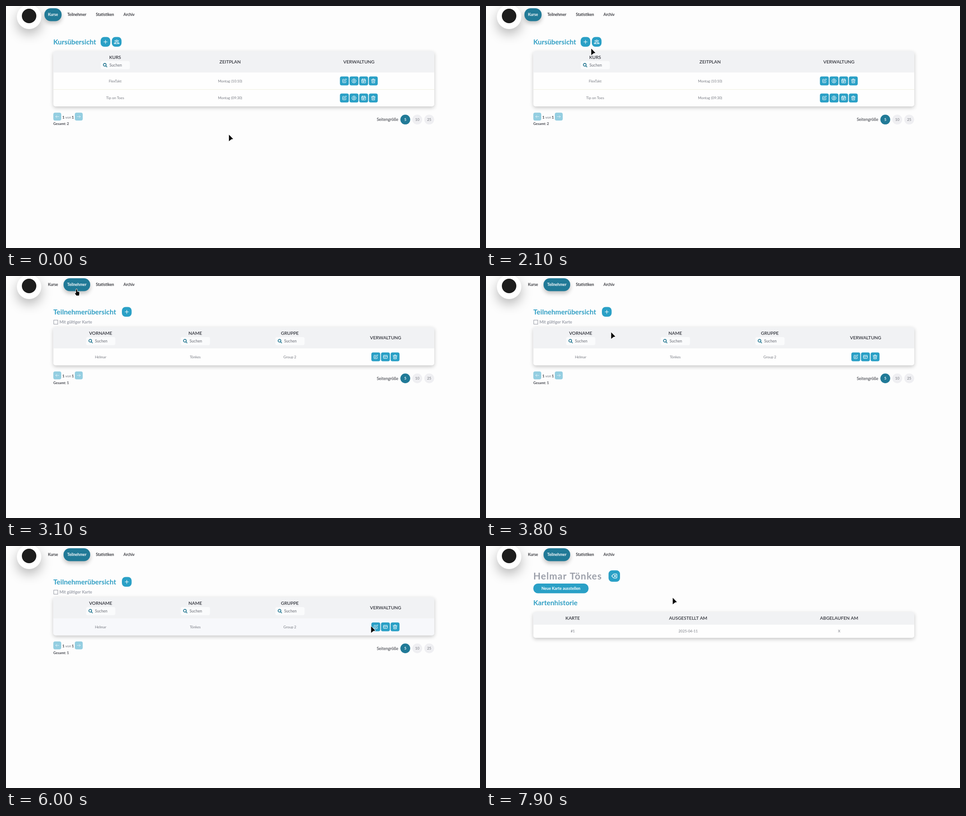
An HTML page with a canvas for the animation above (8000 ms loop, 1047x535 px).

```html
<!DOCTYPE html>
<html lang="de">
<head>
<meta charset="utf-8">
<title>Kursverwaltung</title>
<style>
html, body { margin: 0; width: 100%; height: 100%; overflow: hidden; background: #fdfdfd; }
canvas { display: block; width: 1047px; height: 535px; }
</style>
</head>
<body>
<canvas id="stage" width="1047" height="535"></canvas>
<script>
const ctx = document.getElementById('stage').getContext('2d');
const LOOP = 8000, STEP = 100;
const MAIN = '#2aa0c6', DARK = '#217a97', LIGHT = '#59bad7', PALE = '#94cee1';
const INK = '#30323a', GREY = '#777a82', HEAD = '#f1f2f4', HOVER = '#f7f8fb', PAGE = '#fdfdfd';
const LEFT = 104.5, RIGHT = 946;

// Pointer stops: time, x, y
const PATH = [
  [0, 492, 284], [200, 492, 284], [700, 470, 269], [1100, 417, 234], [1500, 338, 182],
  [2000, 250, 110], [2500, 160, 29], [2700, 146, 19], [3000, 146, 19], [3300, 174, 48],
  [3800, 276, 124], [4200, 366, 174], [4500, 435, 207], [4700, 468, 214], [4900, 484, 215],
  [5300, 620, 206], [5700, 775, 182], [5800, 800, 178], [6000, 806, 177], [6200, 837, 174],
  [7300, 837, 177], [7500, 780, 169], [7700, 672, 153], [7800, 672, 153], [7900, 412, 114], [8000, 412, 114]
];

// Icons on a 24 unit grid
const ICONS = {
  plus: 'M12 5v14M5 12h14',
  edit: 'M11 5H6a2 2 0 0 0-2 2v11a2 2 0 0 0 2 2h11a2 2 0 0 0 2-2v-5M17.5 3.5a2 2 0 0 1 3 3L12 15H9v-3z',
  user: 'M21 12a9 9 0 1 1-18 0a9 9 0 1 1 18 0M15 10a3 3 0 1 1-6 0a3 3 0 1 1 6 0M6.5 18.5a6 6 0 0 1 11 0',
  date: 'M5 5h14a2 2 0 0 1 2 2v12a2 2 0 0 1-2 2H5a2 2 0 0 1-2-2V7a2 2 0 0 1 2-2zM8 2v5M16 2v5M3 10h18M7 14h2M11 14h6M7 17h6',
  trash: 'M19 7l-1 14H6L5 7M3 7h18M9 7V3h6v4M10 11v6M14 11v6',
  card: 'M5 5h14a2 2 0 0 1 2 2v10a2 2 0 0 1-2 2H5a2 2 0 0 1-2-2V7a2 2 0 0 1 2-2zM3 10h18M7 15h1M12 15h1',
  group: 'M15 7a3 3 0 1 1-6 0a3 3 0 1 1 6 0M7 20v-2a5 5 0 0 1 10 0v2zM7 10a2 2 0 1 1-1-4M17 10a2 2 0 1 0 1-4M7 20H2v-2a3 3 0 0 1 5-2M17 20h5v-2a3 3 0 0 0-5-2',
  prev: 'M20 12H4M10 6l-6 6 6 6',
  next: 'M4 12h16M14 6l6 6-6 6',
  back: 'M3 12l6.5-6.5a2 2 0 0 1 1.4-.5H19a2 2 0 0 1 2 2v10a2 2 0 0 1-2 2h-8.1a2 2 0 0 1-1.4-.5zM12 9.5l5 5M17 9.5l-5 5',
  find: 'M17 10a7 7 0 1 1-14 0a7 7 0 1 1 14 0M15 15l6 6'
};
for (const name in ICONS) ICONS[name] = new Path2D(ICONS[name]);
const ARROW = new Path2D('M0 0L9.2 9.4L5 10.2L0 14.4Z');
const HAND = new Path2D('M-1.2 .8Q0-.8 1.2 .8V5.2L5 6Q6.4 6.3 6.2 8L5.4 14H-.2L-3.6 9.6Q-3.4 7.8-1.2 9Z');

function box(x, y, w, h, r, fill, shadow) {
  ctx.save();
  if (shadow) [ctx.shadowColor, ctx.shadowBlur, ctx.shadowOffsetY] = shadow;
  ctx.fillStyle = fill;
  ctx.beginPath();
  ctx.roundRect(x, y, w, h, r);
  ctx.fill();
  ctx.restore();
}

// y is the middle of the capitals
function text(str, x, y, size, weight = 400, color = INK, align = 'center', spacing = 0) {
  ctx.font = `${weight} ${size}px Lato, "Open Sans", sans-serif`;
  ctx.letterSpacing = spacing + 'px';
  ctx.textAlign = align;
  ctx.fillStyle = color;
  ctx.fillText(str, x, y + size * 0.36);
}

function icon(name, x, y, size, color = '#fff', weight = 2) {
  ctx.save();
  ctx.translate(x - size / 2, y - size / 2);
  ctx.scale(size / 24, size / 24);
  ctx.strokeStyle = color;
  ctx.lineWidth = weight;
  ctx.lineCap = ctx.lineJoin = 'round';
  ctx.stroke(ICONS[name]);
  ctx.restore();
}

function button(name, x, y, size, r, fill = MAIN) {
  box(x, y, size, size, r, fill);
  icon(name, x + size / 2, y + size / 2, size * 0.6);
}

function title(str, y) { text(str, LEFT, y, 15.3, 700, '#319fc4', 'left'); }
function label(str, x, y) { text(str, x, y, 10.1, 600); }
function cell(str, x, y) { text(str, x, y, 7.9, 400, GREY); }

function table(y, head, rows, rowH, hot) {
  const h = head + rows * rowH, w = RIGHT - LEFT;
  box(LEFT, y, w, h, 5, '#fefefe', ['rgba(0,0,0,.22)', 8, 3]);
  box(LEFT, y, w, head, [5, 5, 0, 0], HEAD);
  for (let i = 0; i < rows; i++) {
    const top = y + head + i * rowH, last = i === rows - 1;
    if (hot > top && hot <= top + rowH) box(LEFT, top, w, rowH, last ? [0, 0, 5, 5] : 0, HOVER);
    if (!last) box(LEFT, top + rowH - 0.5, w, 1, 0, '#eeeee0');
  }
}

function search(name, x, y) {
  label(name, x, y);
  box(x - 32, y + 8.5, 64.5, 18, 4, '#fafbfc');
  icon('find', x - 22, y + 17.5, 10.5, '#20758f', 3.6);
  text('Suchen', x - 12.5, y + 17.5, 8.5, 600, '#80838b', 'left');
}

function actions(names, x, y, hot) {
  names.forEach((n, i) => button(n, x + i * 21.3, y, 19.6, 4, n === hot ? LIGHT : MAIN));
}

function pager(y, total) {
  [['prev', LEFT], ['next', 152]].forEach(([n, x]) => {
    box(x, y, 17.5, 17.5, 4, PALE);
    icon(n, x + 8.75, y + 8.75, 10.5, '#f2f9fb', 1.8);
  });
  text('1', 124.5, y + 10.2, 8, 700, INK, 'left');
  text('von', 137.5, y + 10.2, 8, 400, GREY);
  text('1', 150, y + 10.2, 8, 700, INK, 'right');
  text('Gesamt: ' + total, LEFT, y + 24.8, 7.7, 700, '#43454d', 'left');
  text('Seitengröße', 819, y + 15.3, 9, 400, INK, 'left');
  ['5', '10', '25'].forEach((n, i) => {
    const x = 882 + i * 26.4;
    box(x - 10.9, y + 4.5, 21.8, 21.5, 10.8, i ? '#efeff2' : DARK);
    text(n, x, y + 15.3, 7.9, i ? 400 : 700, i ? '#74777f' : '#fff');
  });
}

function nav(active, hover) {
  box(24, -3, 54, 54, 27, '#fff', ['rgba(0,0,0,.28)', 26, 11]);
  box(35, 6, 32, 32, 16, '#1c1c1c');
  const items = [['Kurse', 103.8, 38], ['Teilnehmer', 156.5, 59], ['Statistiken', 218.5, 0], ['Archiv', 271.8, 0]];
  items.forEach(([name, x, w], i) => {
    const on = i === active, over = i === hover && !on;
    if (on) box(x - w / 2, 5, w, 28.5, 14, DARK, ['rgba(0,0,0,.24)', 10, 5]);
    if (over) box(x - 31.5, 4, 63, 30.5, 15, LIGHT);
    text(name, x, 19.2, over ? 9.2 : 8.6, on || over ? 700 : 600, on || over ? '#fff' : '#202127');
  });
}

function courses(hot) {
  title('Kursübersicht', 79.5);
  button('plus', 209, 68.5, 21.5, 8);
  button('group', 233.7, 68.5, 21.5, 8);
  table(100, 47, 2, 37.5, hot);
  search('KURS', 241, 113.3);
  label('ZEITPLAN', 495, 123.3);
  label('VERWALTUNG', 779.5, 123.3);
  [['FlexTakt', '10:10'], ['Tip on Toes', '09:30']].forEach(([name, hour], i) => {
    const y = 165.8 + i * 37.8;
    cell(name, 241, y);
    cell(`Montag (${hour})`, 495, y);
    actions(['edit', 'user', 'date', 'trash'], 737.6, y - 10, '');
  });
  pager(235.8, 2);
}

function members(hot, pressed, loaded) {
  title('Teilnehmerübersicht', 79.5);
  button('plus', 256, 68.5, 21.5, 8);
  if (!loaded) return;
  ctx.lineWidth = 1;
  ctx.strokeStyle = '#9598a2';
  ctx.strokeRect(105.5, 97.5, 9, 9);
  text('Mit gültiger Karte', 118, 102, 9.1, 700, '#9ca0aa', 'left');
  table(113, 47, 1, 37.5, hot);
  [['VORNAME', 'Helmar'], ['NAME', 'Tönkes'], ['GRUPPE', 'Group 2']].forEach(([name, value], i) => {
    search(name, 209 + i * 209, 126.5);
    cell(value, 209 + i * 209, 179);
  });
  label('VERWALTUNG', 838.5, 136.5);
  actions(['edit', 'card', 'trash'], 807, 169, pressed ? 'card' : '');
  pager(211, 1);
}

function cards(hot) {
  text('Helmar Tönkes', LEFT, 66.3, 20.8, 700, '#9ca0aa', 'left', 1.1);
  button('back', 270.7, 53.7, 25.3, 8);
  box(LEFT, 83, 122, 21.5, 10, MAIN);
  text('Neue Karte ausstellen', 165.5, 93.7, 8.8, 700, '#fff');
  title('Kartenhistorie', 125.3);
  table(146, 28, 1, 29, hot);
  [['KARTE', '#1', 191.5], ['AUSGESTELLT AM', '2025-04-11', 446.5], ['ABGELAUFEN AM', 'X', 780]]
    .forEach(([name, value, x]) => {
      label(name, x, 159.5);
      cell(value, x, 188.2);
    });
}

function pointer(t) {
  const i = Math.max(1, PATH.findIndex(p => p[0] >= t));
  const [t0, x0, y0] = PATH[i - 1], [t1, x1, y1] = PATH[i];
  const k = Math.max(0, (t - t0) / (t1 - t0));
  return [x0 + (x1 - x0) * k, y0 + (y1 - y0) * k];
}

function cursor(x, y, hand) {
  ctx.save();
  ctx.translate(x + 0.5, y + 0.5);
  ctx.strokeStyle = '#fff';
  ctx.lineWidth = 1.6;
  ctx.lineJoin = 'round';
  ctx.fillStyle = '#000';
  const shape = hand ? HAND : ARROW;
  ctx.stroke(shape);
  ctx.fill(shape);
  ctx.restore();
}

function draw(t) {
  const [x, y] = pointer(t);
  const hot = pointer(Math.max(0, t - STEP))[1];
  const onNav = x > 127 && x < 186 && y < 34;
  const onCard = t >= 6200 && t < 6700;
  box(0, 0, 1047, 535, 0, PAGE);
  nav(t < 2900 ? 0 : 1, onNav ? 1 : -1);
  if (t < 2900) courses(hot);
  else if (t < 6700) members(hot, onCard, t >= 3000);
  else cards(hot);
  cursor(x, y, onNav || onCard);
}

function tick() {
  draw(Math.floor(performance.now() % LOOP / STEP) * STEP);
  requestAnimationFrame(tick);
}
tick();
</script>
</body>
</html>
```
